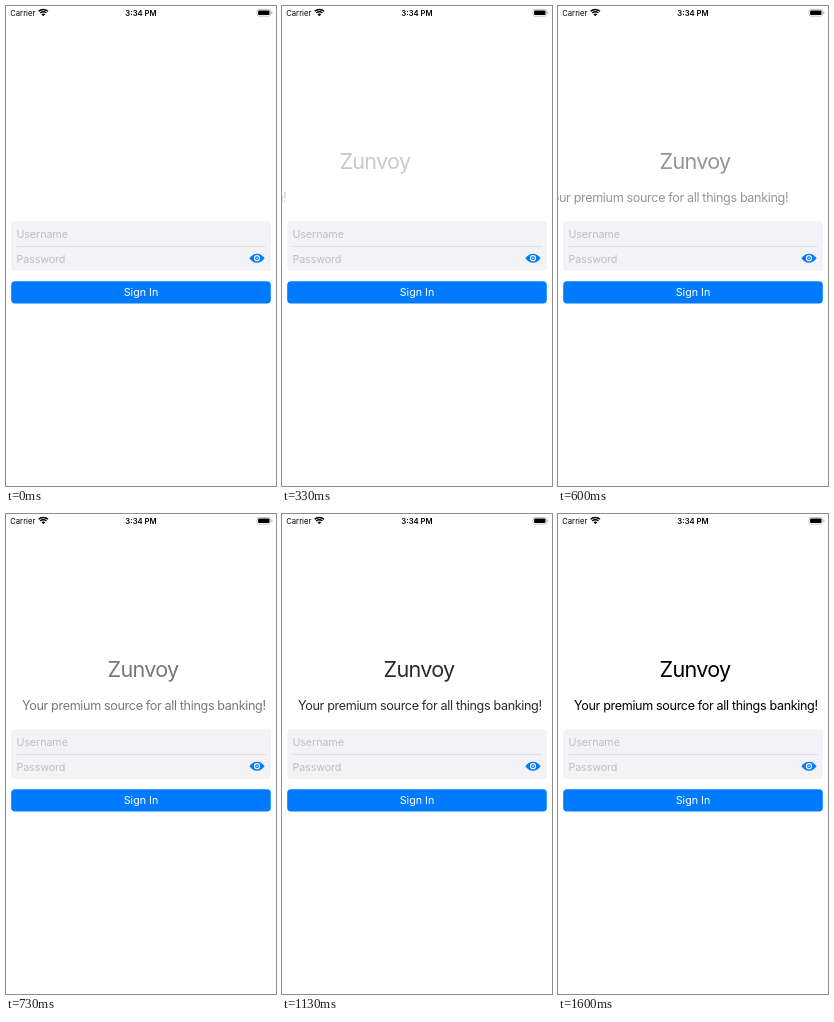
Write an HTML page that moves like this. It is 270 px wide and 480 px high and loops after 1.79 s.

```html
<!DOCTYPE html>
<html lang="en">
<head>
<meta charset="utf-8">
<title>Sign in</title>
<style>
  html, body { margin: 0; width: 100%; height: 100%; overflow: hidden; background: #fff; }
  svg { display: block; width: 100vw; height: 100vh; }
  text { font-family: Inter, Roboto, "Liberation Sans", sans-serif; }
  .mid { text-anchor: middle; }
  .status { font-size: 7.7px; }
  .time { font-weight: 600; }
  .field { font-size: 10.75px; letter-spacing: -.1px; fill: #bfbfc4; }
  .button { font-size: 10.75px; fill: #fff; }
  #title { font-size: 21.6px; letter-spacing: -.7px; }
  #tagline { font-size: 12.6px; letter-spacing: -.35px; }
</style>
</head>
<body>
<svg viewBox="0 0 270 480" preserveAspectRatio="none">
  <defs>
    <clipPath id="fan"><path d="M37.3 10.2 29 1.6H45.6Z"/></clipPath>
  </defs>

  <!-- status bar -->
  <text class="status" x="4.2" y="9.7">Carrier</text>
  <g clip-path="url(#fan)" fill="none" stroke="#000" stroke-width="1.5">
    <circle cx="37.3" cy="10" r="6.6"/>
    <circle cx="37.3" cy="10" r="4.2"/>
    <circle cx="37.3" cy="10" r="2.4" fill="#000" stroke="none"/>
  </g>
  <text class="status time mid" x="135" y="9.7">3:34 PM</text>
  <rect x="251" y="3.4" width="13.6" height="6.8" rx="2" fill="none" stroke="#a6a6a6" stroke-width=".65"/>
  <rect x="252.1" y="4.5" width="11.4" height="4.6" rx="1.1"/>
  <path d="M265.4 5.6q1.1.3 1.1 1.2t-1.1 1.2z" fill="#a6a6a6"/>

  <!-- form -->
  <rect x="5.2" y="215.2" width="259.6" height="49.8" rx="3.4" fill="#f2f2f7"/>
  <rect x="10.4" y="240" width="249.2" height=".7" fill="#d6d6db"/>
  <text class="field" x="10.4" y="232">Username</text>
  <text class="field" x="10.4" y="257">Password</text>
  <g fill="#007aff">
    <path d="M243.4 252.2C245.2 249.6 248 247.7 251 247.7S256.8 249.6 258.6 252.2C256.8 254.9 254 256.8 251 256.8S245.2 254.9 243.4 252.2Z"/>
    <circle cx="251" cy="252.2" r="2.5" stroke="#f2f2f7" stroke-width="1.2"/>
    <circle cx="251" cy="252.2" r=".8" fill="#f2f2f7"/>
    <rect x="5.2" y="275.2" width="259.6" height="22.4" rx="3.8"/>
  </g>
  <text class="button mid" x="135" y="290.4">Sign In</text>

  <!-- sliding labels -->
  <text id="title" class="mid" x="137" y="163">Zunvoy</text>
  <text id="tagline" class="mid" x="137.9" y="196.2">Your premium source for all things banking!</text>
</svg>
<script>
  const LOOP = 1790, TICK = 1000 / 15, TRAVEL = 663;
  const title = document.getElementById('title');
  const tagline = document.getElementById('tagline');

  // cubic-bezier(.42, 0, .58, 1)
  function easeInOut(x) {
    if (x <= 0) return 0;
    if (x >= 1) return 1;
    let lo = 0, hi = 1, s = .5;
    for (let i = 0; i < 24; i++) {
      s = (lo + hi) / 2;
      const bx = 1.26 * s * (1 - s) ** 2 + 1.74 * s * s * (1 - s) + s ** 3;
      if (bx < x) lo = s; else hi = s;
    }
    return s * s * (3 - 2 * s);
  }

  // progress of an eased move that finishes at `end`
  const progress = (t, end, length) => easeInOut(1 - (end - t) / length);

  function place(label, t, end, alpha) {
    const x = TRAVEL * (progress(t, end, 940) - 1);
    label.setAttribute('transform', `translate(${x.toFixed(2)} 0)`);
    label.setAttribute('opacity', alpha.toFixed(3));
  }

  function draw(ms) {
    // the picture advances in 15 Hz steps
    const t = Math.floor((ms % LOOP + 5) / TICK) * TICK;
    const alpha = t >= 1599 ? 1 : progress(t, 1700, 2000);
    place(title, t, 503.5, alpha);
    place(tagline, t, 740, alpha);
  }

  const start = performance.now();
  function loop() {
    draw(performance.now() - start);
    requestAnimationFrame(loop);
  }
  loop();
</script>
</body>
</html>
```
